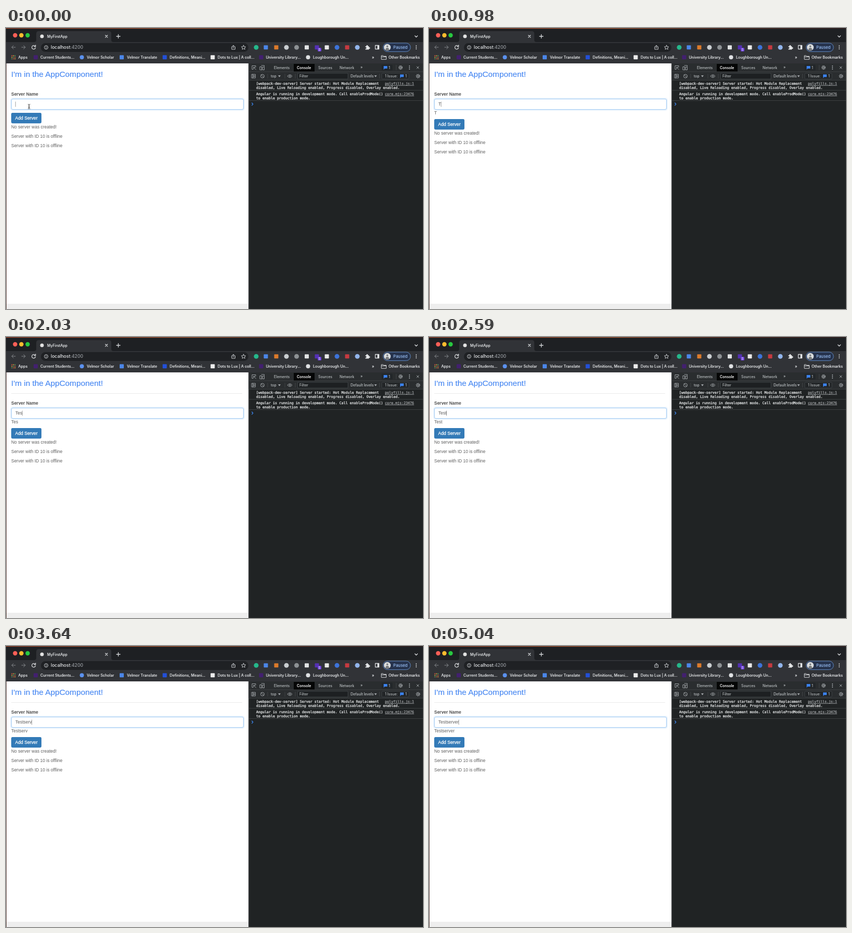
Animation, 800 px wide and 540 px high, one loop 5.11 s. Source, as an HTML page:

```html
<!DOCTYPE html>
<html lang="en">
<head>
<meta charset="utf-8">
<title>MyFirstApp</title>
<style>
html, body { margin: 0; width: 100%; height: 100%; overflow: hidden; background: #202324; }
svg { display: block; width: 800px; height: 540px; }
text { white-space: pre; }
.ui { font: 500 7.2px Inter, sans-serif; fill: #e8eaec; stroke: #e8eaec; stroke-width: .12; }
.url { font-size: 8.6px; stroke: none; }
.dev { font: 500 6.9px Inter, sans-serif; fill: #bcc0c3; }
.log { font: 6.645px "DejaVu Sans Mono", monospace; fill: #dfe1e2; stroke: #dfe1e2; stroke-width: .3; }
.link { fill: #bcbfc1; stroke: #bcbfc1; stroke-width: .12; text-decoration: underline; }
.page { font: 8.48px "Liberation Sans", Arial, sans-serif; fill: #606060; }
.line { fill: none; stroke: #d6d8da; stroke-width: 1; stroke-linecap: round; stroke-linejoin: round; }
.thick { stroke-width: 1.3; }
.dim { stroke: #85888c; }
.grey { stroke: #a9adb0; stroke-width: .9; }
.pale { stroke: #c9cccf; }
</style>
</head>
<body>
<svg viewBox="0 0 800 540">
  <defs>
    <linearGradient id="desktop">
      <stop offset="0" stop-color="#a3492f"/><stop offset=".45" stop-color="#b5623a"/>
      <stop offset=".7" stop-color="#6b3527"/><stop offset="1" stop-color="#33201f"/>
    </linearGradient>
    <filter id="glow" x="-5%" y="-40%" width="110%" height="180%"><feGaussianBlur stdDeviation="1.2"/></filter>
    <g id="gear" class="line grey">
      <circle r="2.7"/><circle r="1"/>
      <circle r="3.6" style="stroke-width:1.2;stroke-linecap:butt" stroke-dasharray="1.1 1.727"/>
    </g>
    <path id="bubble" fill="#3b82ee" d="M-3.5-3h7v5h-5l-2 2z"/>
    <g id="menu"><circle cy="-3" r=".9"/><circle r=".9"/><circle cy="3" r=".9"/></g>
    <path id="cross" d="M-2-2 2 2M2-2-2 2"/>
  </defs>

  <!-- Window and tab strip -->
  <rect width="800" height="540" fill="#1e2023"/>
  <rect width="800" height="1.2" fill="url(#desktop)"/>
  <circle cx="17.5" cy="14" r="4.2" fill="#fe5f57"/>
  <circle cx="29.5" cy="14" r="4.2" fill="#febc2e"/>
  <circle cx="41.5" cy="14" r="4.2" fill="#28c840"/>
  <path fill="#313337" d="M0 27h54q4 0 4-4V11q0-5 5-5h134q5 0 5 5v12q0 4 4 4h594v41H0z"/>
  <circle cx="69" cy="16" r="3.5" fill="#e2e2e2"/>
  <text class="ui" x="79" y="18.7" style="font-size:7px">MyFirstApp</text>
  <g class="line thick">
    <use href="#cross" x="192.7" y="16"/>
    <path d="M215.5 12.5v7M212 16h7M784.5 15l2.5 2.5 2.5-2.5"/>
  </g>

  <!-- Toolbar -->
  <g class="line dim">
    <path d="M18 37h-7m3.2-3.3L11 37l3.2 3.3"/>
    <path d="M30 37h7m-3.2-3.3L37 37l-3.2 3.3"/>
  </g>
  <path class="line thick" d="M56 35.2a3.5 3.5 0 1 0 .5 2.8M56.7 33v2.7H54"/>
  <rect x="67" y="29" width="398" height="17" rx="8.5" fill="#1f2124"/>
  <g class="line pale">
    <circle cx="77" cy="37.3" r="3.5"/><path d="M77 37v2M77 35.4v.1"/>
    <path d="M434.5 36h-1.5v5h6.5v-5H438M436.2 38.500v-5m-1.700 1.500 1.700-1.700L438 35"/>
    <path d="m455.700 33.200 1.200 2.700 3 .3-2.200 2 .6 2.900-2.600-1.500-2.600 1.500.6-2.900-2.200-2 3-.3z"/>
  </g>
  <text class="ui url" x="86" y="40.4">localhost<tspan fill="#9a9ea3">:4200</tspan></text>
  <g id="extensions"></g>
  <rect x="598" y="38" width="7" height="7" rx="1.5" fill="#6b3dd8"/>
  <text class="ui" x="599.7" y="43.6" style="font-size:5.5px">5</text>
  <path fill="#e4e6e8" d="M689.5 35h2a1.500 1.500 0 1 1 2.800 0h2v2.200a1.500 1.500 0 1 1 0 2.600v1.700h-6.800v-2a1.400 1.400 0 1 0 0-2.600z"/>
  <path class="line thick" d="M708.5 33.5h7v7h-7z"/><path fill="#e4e6e8" d="M712.5 33.5h3v7h-3z"/>
  <rect x="723.5" y="29" width="52.5" height="16.5" rx="8.2" fill="#26334d" stroke="#5f86bd"/>
  <circle cx="731.5" cy="37.2" r="6.5" fill="#d9dcdd"/>
  <path fill="#77797b" d="M728 42.5q0-4.500 3.500-4.500t3.500 4.500q-3.500 2-7 0zM729.700 35.200a1.800 1.800 0 1 1 3.600 0 1.800 1.800 0 0 1-3.600 0"/>
  <text class="ui" x="743" y="40" style="font-size:7.7px;fill:#9cc3fa;stroke:none">Paused</text>
  <use href="#menu" x="787" y="37.2" fill="#e4e6e8"/>

  <!-- Bookmarks -->
  <g id="apps"></g>
  <g id="bookmarks"></g>
  <text class="ui" x="702" y="58.8">»</text>
  <path class="line" d="M720.5 53h3l1 1.300h5v6h-9zM720.5 55.500h9"/>
  <text class="ui" x="734" y="58.9">Other Bookmarks</text>

  <!-- Page -->
  <rect x="1" y="68" width="464.5" height="462" fill="#fff"/>
  <rect x="1" y="530" width="464.5" height="10" fill="#eee"/>
  <text class="page" x="10" y="93.6" style="font-size:15.35px;fill:#4b8af2;stroke:#4b8af2;stroke-width:.2">I'm in the AppComponent!</text>
  <path id="rule" stroke="#eaeaea" d="M10 108.500h443"/>
  <text class="page" x="10" y="130.2" style="font-weight:bold;fill:#505050">Server Name</text>
  <rect x="10" y="136" width="446" height="21" rx="3" fill="none" stroke="#a9d0f5" stroke-width="2" opacity=".55" filter="url(#glow)"/>
  <rect x="10.5" y="136.5" width="445" height="20" rx="2.5" fill="#fff" stroke="#a3cbf3"/>
  <text class="page" id="field" x="18" y="149.4"></text>
  <rect id="caret" y="141.5" width=".8" height="10" fill="#888"/>
  <path id="pointer" class="line" style="stroke:#444;stroke-width:.9" d="M42.5 146.500q1.700 0 1.700 1.300v6.400q0 1.300-1.700 1.300M46 146.500q-1.800 0-1.800 1.300v6.400q0 1.300 1.800 1.300M43.200 152.500h2"/>
  <text class="page" id="echo" x="10" y="165.7"></text>
  <g id="below">
    <rect x="10" y="163" width="58" height="20.2" rx="2.4" fill="#337ab7"/>
    <text class="page" x="17.5" y="176.2" style="font-size:8.6px;fill:#fff;stroke:#fff;stroke-width:.25">Add Server</text>
    <text class="page" x="10" y="192.5">No server was created!</text>
    <text class="page" x="10" y="210.7">Server with ID 10 is offline</text>
    <text class="page" x="10" y="228.8">Server with ID 10 is offline</text>
  </g>

  <!-- Developer tools -->
  <rect x="465.5" y="68" width="334.5" height="472" fill="#202324"/>
  <rect x="465.5" y="68" width="334.5" height="32" fill="#2a2d2f"/>
  <path stroke="#44484b" stroke-width=".8" d="M466 84h334M466 100.300h334M466 119.800h334M466 139.500h334M502 88v9M535 88v9M555 88v9M716.500 88v9M748.500 71v10M466 68v472"/>
  <rect x="552" y="69" width="40" height="14.5" fill="#050606"/>
  <g class="line grey">
    <path d="M474 79.500h-2v-7h7v2.500M475 75.500l4.500 4.500M475 78.500v-3h3"/>
    <path d="M490 72h5.500v2M488 80.500h-1v-6h3.500v6zM492.500 75h3v5.500h-3z"/>
    <path d="M471.500 89h7v7h-7zM473.500 89v7M475.500 91l2 1.500-2 1.500z"/>
    <circle cx="492" cy="92.5" r="3.5"/><path d="m489.500 90 5 5"/>
    <path d="M540 92.500q4.500-5.500 9 0-4.500 5.500-9 0"/><circle cx="544.5" cy="92.5" r="1.2"/>
    <use href="#cross" x="790" y="76"/>
  </g>
  <rect x="720.5" y="70.5" width="21" height="11" rx="1.5" fill="#222629"/>
  <rect x="559.5" y="87" width="96.5" height="11" fill="#1d2022" stroke="#44494d" stroke-width=".8"/>
  <rect x="721" y="87" width="52" height="11" rx="1.5" fill="#222527" stroke="#44494d" stroke-width=".8"/>
  <use href="#bubble" x="728" y="76"/><use href="#bubble" x="759.5" y="92.3"/>
  <use href="#gear" x="757" y="76"/><use href="#gear" x="790.5" y="92.5"/>
  <use href="#menu" x="774" y="76" fill="#b4b8bc"/>
  <g id="labels"></g>
  <path fill="#a2a6aa" d="M522 91h5l-2.500 3.500zM706.500 91h5l-2.500 3.500z"/>
  <g id="console"></g>
  <path class="line thick" style="stroke:#3d86f0" d="m471.800 144 2 2.300-2 2.300"/>
  <rect y="68" width="1" height="472" fill="#5b4039"/>
</svg>
<script>
const LOOP = 5110;
const WORD = 'Testserver';
const KEY_TIMES = [770, 1750, 2030, 2310, 2870, 3150, 3360, 3570, 4060, 4340];
const RULE_TIME = 1190;
const $ = id => document.getElementById(id);
const fillGroup = (id, items, draw) => { $(id).innerHTML = items.map(draw).join(''); };
const text = (cls, x, y, words) => `<text class="${cls}" x="${x}" y="${y}">${words}</text>`;
const badge = (x, y, shape, color, r = 4) => shape === 'o'
  ? `<circle cx="${x}" cy="${y}" r="${r}" fill="${color}"/>`
  : `<rect x="${x - r}" y="${y - r}" width="${2 * r}" height="${2 * r}" rx="1" fill="${color}"/>`;

fillGroup('extensions', [
  [480, 'o', '#25b88b'], [498.5, 's', '#4b86e8'], [518.5, 's', '#dc7a2b'], [538, 'o', '#c9cdd0'],
  [557.5, 'o', '#8d9194'], [577, 's', '#e1e3e4'], [596.5, 's', '#5430b4'], [615.5, 's', '#e8e8e8'],
  [635, 'o', '#3d73d9'], [654.5, 's', '#c63a40'], [674, 'o', '#92b5ec'],
], ([x, shape, color]) => badge(x, 37.3, shape, color, shape === 'o' ? 4.5 : 4));

const dotColors = ['#e35445', '#e8a33b', '#55ab62'];
fillGroup('apps', [...Array(9).keys()],
  i => badge(11.3 + i % 3 * 3, 53.3 + (i / 3 | 0) * 3, 's', dotColors[(i + (i / 3 | 0)) % 3], 1));

fillGroup('bookmarks', [
  [23.5, 'Apps'],
  [66, 'Current Students...', 57, 's', '#42206f'],
  [155, 'Velmor Scholar', 145.5, 'o', '#5b91ee'],
  [232, 'Velmor Translate', 222, 's', '#4b86e8'],
  [314, 'Definitions, Meani...', 304.5, 's', '#2350d8'],
  [406, 'Dots to Lux | A coll...', 396.5, 's', '#ececec'],
  [498.5, 'University Library...', 489.5, 's', '#42206f'],
  [589, 'Loughborough Un...', 579.5, 'o', '#dfe1e3'],
], ([x, label, iconX, shape, color]) =>
  (iconX ? badge(iconX, 56.3, shape, color) : '') + text('ui', x, 58.9, label));

fillGroup('labels', [
  [514, 78.6, 'Elements'], [558, 78.6, '<tspan fill="#fff" font-weight="600">Console</tspan>'],
  [599, 78.6, 'Sources'], [640, 78.6, 'Network'], [680, 78.4, '»'], [734, 78.6, '1'],
  [508, 95, 'top'], [563, 95, 'Filter'], [661, 95, 'Default levels'], [727, 95, '1 Issue:'], [766, 95, '1'],
], ([x, y, words]) => text('dev', x, y, words));

fillGroup('console', [
  [480, 109.2, '[webpack-dev-server] Server started: Hot Module Replacement'],
  [480, 117.1, 'disabled, Live Reloading enabled, Progress disabled, Overlay enabled.'],
  [480, 129, 'Angular is running in development mode. Call enableProdMode()'],
  [480, 136.8, 'to enable production mode.'],
  [727, 109.2, 'polyfills.js:1', ' link'], [727, 129, 'core.mjs:23476', ' link'],
], ([x, y, words, extra = '']) => text('log' + extra, x, y, words));

function render(now) {
  const time = now % LOOP;
  const count = KEY_TIMES.filter(t => time >= t).length;
  const typed = WORD.slice(0, count);
  $('field').textContent = $('echo').textContent = typed;
  $('caret').setAttribute('x', 17.8 + (count ? $('field').getComputedTextLength() - .2 : 0));
  $('below').setAttribute('transform', `translate(0 ${count ? 12 : 0})`);
  $('pointer').style.display = count ? 'none' : '';
  $('rule').style.display = time < RULE_TIME ? 'none' : '';
  requestAnimationFrame(render);
}
render(performance.now());
</script>
</body>
</html>
```
